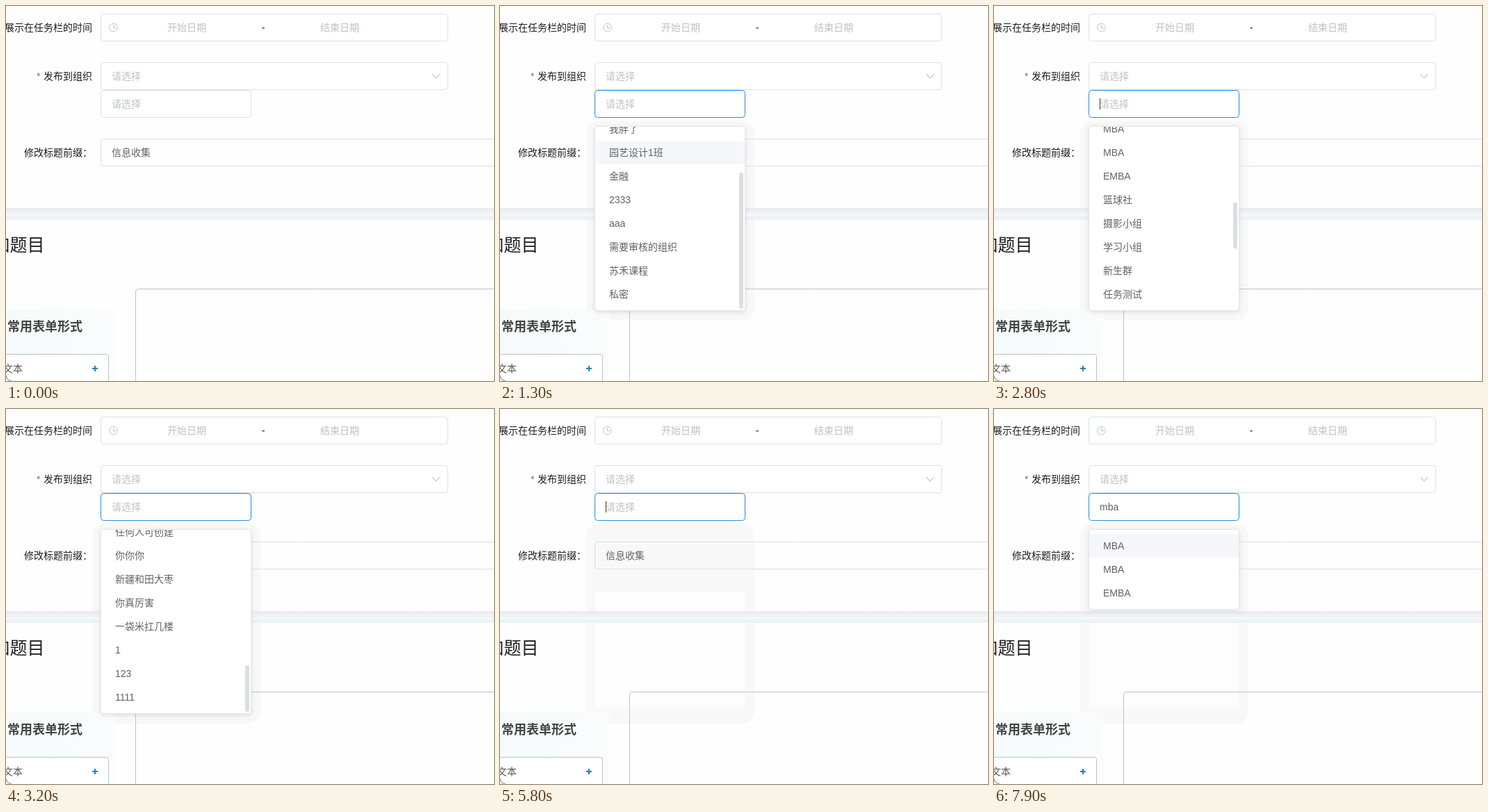
Recreate the animation shown at these times as an HTML page with a canvas. Size 702x540 px, loop 8000 ms.

```html
<!DOCTYPE html>
<html lang="zh-CN">
<head>
<meta charset="utf-8">
<title>选择组织</title>
<style>
html, body { margin: 0; width: 100%; height: 100%; overflow: hidden; background: #fff; }
canvas { display: block; width: 702px; height: 540px; }
</style>
</head>
<body>
<canvas id="stage" width="702" height="540"></canvas>
<script>
const ctx = document.getElementById('stage').getContext('2d');
const LOOP = 8000, TICK = 100;
const FONT = '"Liberation Sans", "Noto Sans CJK SC", "Noto Sans CJK", sans-serif';
const LINE = '#dcdfe6', HINT = '#bfc1c7', BODY = '#606266', DARK = '#1d1d1f', BLUE = '#1f8be8';
const ROW = 34, PAD = 6, VIEW = 264, TOP = 174;

const groups = [
  '测试组织', '读书会', '我胖了', '园艺设计1班', '金融', '2333', 'aaa', '需要审核的组织', '苏禾课程', '私密',
  '运动', 'M3405178', 'MBA', 'MBA', 'EMBA', '篮球社', '摄影小组', '学习小组', '新生群', '任务测试',
  '公开组织', '免审核组织', '任何人可创建', '你你你', '新疆和田大枣', '你真厉害', '一袋米扛几楼', '1', '123', '1111',
  '测试', '出v好', '回归3'
];
const matches = ['MBA', 'MBA', 'EMBA'];

// [time, value] pairs
const scrollKeys = [[900, 0], [1300, 88], [1800, 88], [2100, 188], [2300, 188], [2500, 428],
  [2900, 428], [3200, 768], [3900, 768], [4100, 868]];
const sizeKeys = [[0, 10], [1400, 20], [2800, 30], [3800, 40]];
const hoverKeys = [[0, 0], [1300, 3], [1900, 5], [3800, 25]];
const typedKeys = [[0, ''], [6600, 'm'], [6800, 'mb'], [7100, 'mba']];
const caretSpans = [[400, 1000], [1600, 2100], [2500, 3100], [3500, 4000], [4600, 4700], [5800, 6300], [6600, 7600]];

const clamp = x => Math.max(0, Math.min(1, x));
const easeOut = x => 1 - (1 - clamp(x)) ** 4;
const smooth = x => x * x * (3 - 2 * x);
const latest = (keys, t) => keys.filter(k => k[0] <= t).pop()[1];

function tween(keys, t) {
  const i = keys.findIndex(k => k[0] > t);
  if (i < 0) return keys[keys.length - 1][1];
  if (i === 0) return keys[0][1];
  const [t0, a] = keys[i - 1], [t1, b] = keys[i];
  return a + (b - a) * smooth((t - t0) / (t1 - t0));
}

function openness(t) {
  if (t < 4300) return easeOut((t - 500) / 300);
  if (t < 5800) return 1 - clamp((t - 4300) / 400);
  return easeOut((t - 5800) / 300);
}

function text(str, x, y, color = DARK, size = 14, align = 'left', weight = '') {
  ctx.font = `${weight} ${size}px ${FONT}`;
  ctx.textAlign = align;
  ctx.fillStyle = color;
  ctx.fillText(str, x, y + Math.round(size * 0.36));
}

function rect(x, y, w, h, color) {
  ctx.fillStyle = color;
  ctx.fillRect(x, y, w, h);
}

function round(x, y, w, h, r, fill, stroke) {
  ctx.beginPath();
  ctx.roundRect(x, y, w, h, r);
  if (fill) { ctx.fillStyle = fill; ctx.fill(); }
  if (stroke) { ctx.strokeStyle = stroke; ctx.lineWidth = 1; ctx.stroke(); }
}

function path(points, color, width = 1) {
  ctx.beginPath();
  points.forEach(([x, y]) => ctx.lineTo(x, y));
  ctx.strokeStyle = color;
  ctx.lineWidth = width;
  ctx.stroke();
}

function fade(y, h, from, to) {
  const g = ctx.createLinearGradient(0, y, 0, y + h);
  g.addColorStop(0, from);
  g.addColorStop(1, to);
  rect(0, y, 702, h, g);
}

function halo() {
  round(124, 165, 242, 288, 18, '#f8f8f8');
  rect(137, 264, 215, 166, '#fdfdfd');
}

function form(t) {
  text('展示在任务栏的时间', 124, 31, DARK, 14, 'right');
  round(136.5, 11.5, 499, 39, 4, '#fff', LINE);
  ctx.beginPath();
  ctx.arc(154.5, 31, 5.8, 0, Math.PI * 2);
  ctx.strokeStyle = HINT;
  ctx.lineWidth = 1;
  ctx.stroke();
  path([[154.5, 27], [154.5, 31.5], [158, 31.5]], HINT);
  text('开始日期', 260, 31, HINT, 14, 'center');
  text('-', 370, 31, DARK, 14, 'center');
  text('结束日期', 480, 31, HINT, 14, 'center');

  text('*', 44, 101, '#b5653f');
  text('发布到组织', 124, 101, DARK, 14, 'right');
  round(136.5, 81.5, 499, 39, 4, '#fff', LINE);
  text('请选择', 152, 101, HINT);
  path([[613.5, 98.5], [618.8, 103.8], [624, 98.5]], HINT, 1.1);

  text('修改标题前缀：', 26, 211);
  round(136.5, 191.5, 600, 39, 4, null, LINE);
  text('信息收集', 152, 211, BODY);
  search(t);
}

function search(t) {
  const typed = latest(typedKeys, t);
  round(136.5, 121.5, 216, 39, 4, '#fff', t >= 400 ? BLUE : LINE);
  text(typed || '请选择', 152, 141, typed ? BODY : HINT);
  if (caretSpans.some(([a, b]) => t >= a && t < b)) {
    rect(152 + Math.floor(ctx.measureText(typed).width), 133, 1, 16, '#333');
  }
}

function lower() {
  fade(291, 8, '#e7e9ec', '#f3f4f6');
  rect(0, 299, 702, 1, '#eef0f2');
  rect(0, 300, 702, 2, '#f8f9fa');
  fade(302, 6, '#eef2f5', '#e9f4f7');

  text('添加题目', 55.5, 344, DARK, 25, 'right');
  round(186.5, 407.5, 600, 200, 4, null, '#bcc2d2');

  const tint = ctx.createLinearGradient(0, 0, 157, 0);
  tint.addColorStop(0, '#f5fafa');
  tint.addColorStop(1, '#fafcfc');
  rect(0, 437, 157, 103, tint);
  text('常用表单形式', 2, 462, '#444', 18, 'left', 'bold');
  round(-20.5, 501.5, 168, 60, 3, '#fff', '#b9c0d0');
  text('文本', -4, 522, '#5c544f');
  path([[124, 522], [132, 522]], '#1b87b5', 2);
  path([[128, 518], [128, 526]], '#1b87b5', 2);
  ctx.beginPath();
  ctx.moveTo(0, 532);
  ctx.quadraticCurveTo(1, 539, 8, 540);
  ctx.strokeStyle = '#a3a3a3';
  ctx.lineWidth = 1.5;
  ctx.stroke();
}

function menu(t) {
  const open = openness(t);
  if (open <= 0) return;
  const found = t >= 7200;
  const items = found ? matches : groups;
  const size = found ? matches.length : latest(sizeKeys, t);
  const full = size * ROW + PAD * 2;
  const height = Math.min(VIEW, full);
  const offset = found ? 0 : tween(scrollKeys, t);
  const hover = found ? 0 : latest(hoverKeys, t);

  ctx.save();
  ctx.globalAlpha = open;
  ctx.translate(0, TOP);
  ctx.scale(1, open);
  ctx.translate(0, -TOP);

  ctx.shadowColor = 'rgba(0,0,0,.12)';
  ctx.shadowBlur = 6;
  ctx.shadowOffsetY = 2;
  round(136.5, 173.5, 216, height + 1, 4, '#fff');
  ctx.shadowColor = 'transparent';

  ctx.save();
  ctx.beginPath();
  ctx.rect(137, TOP, 215, height);
  ctx.clip();
  items.slice(0, size).forEach((name, i) => {
    const y = TOP + PAD + i * ROW - Math.round(offset);
    if (y < TOP - ROW || y > TOP + height) return;
    if (i === hover) rect(137, y, 215, ROW, '#f5f7fa');
    const soft = found && i === 0 && t < 7900;
    text(name, 157, y + ROW / 2, soft ? '#6c6e73' : BODY);
  });
  ctx.restore();

  if (full > VIEW) {
    const track = VIEW - 2;
    round(344, TOP + offset / full * track, 6, VIEW / full * track, 3, '#dddee0');
  }
  round(136.5, 173.5, 216, height + 1, 4, null, '#e4e7ed');
  ctx.restore();
}

function draw(now) {
  const t = Math.floor(now % LOOP / TICK) * TICK;
  rect(0, 0, 702, 540, '#fefefe');
  if (t >= 600) halo();
  form(t);
  lower();
  menu(t);
}

const start = performance.now();
function frame() {
  draw(performance.now() - start);
  requestAnimationFrame(frame);
}
frame();
</script>
</body>
</html>
```
